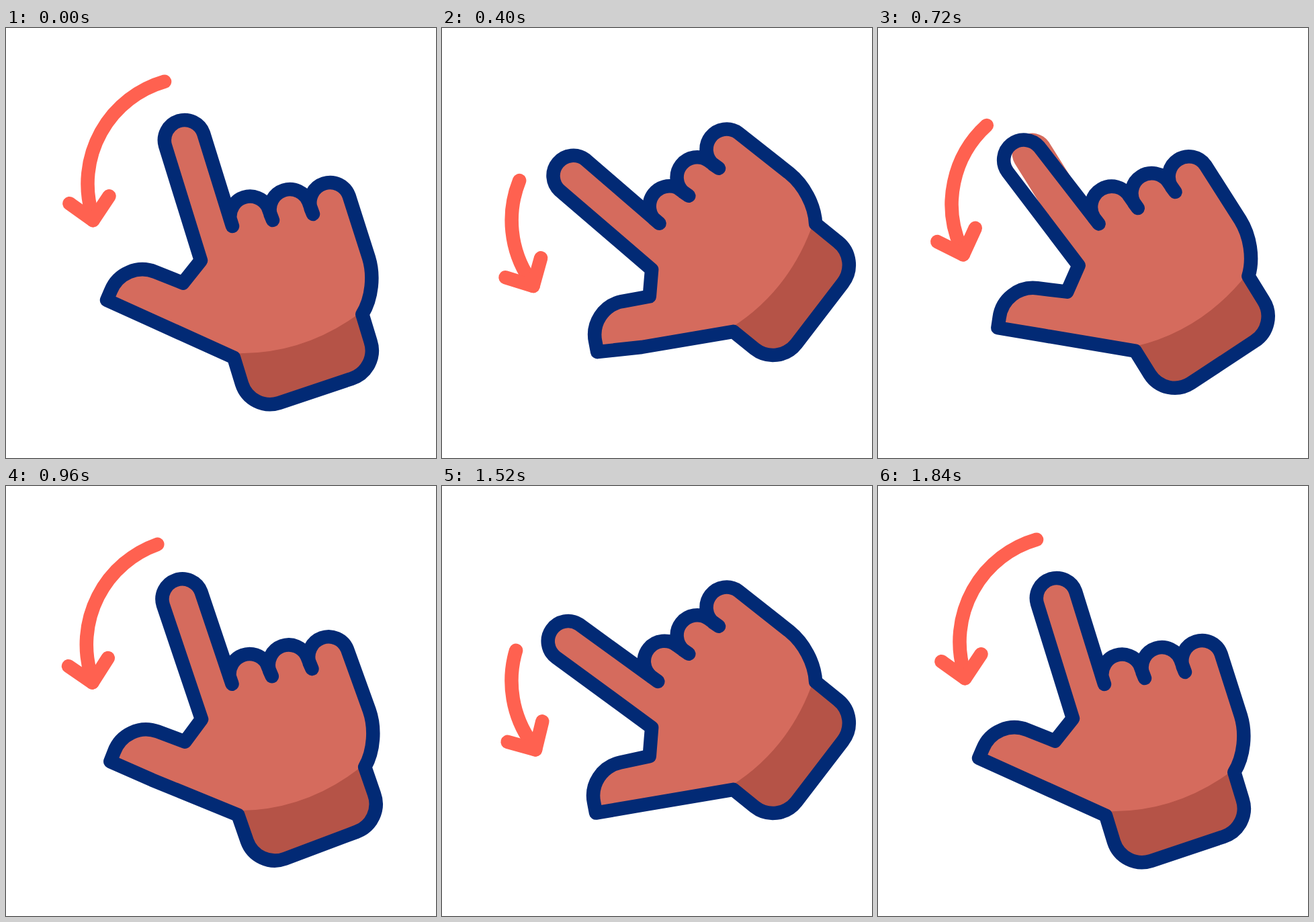
Write an HTML page that moves like this. It is 640 by 640 pixels and loops after 2 s.

```html
<!DOCTYPE html>
<html lang="en">
<head>
<meta charset="utf-8">
<title>Swipe gesture</title>
<style>
html, body { margin: 0; width: 100%; height: 100%; overflow: hidden; background: #fff; }
svg { display: block; width: 100%; height: 100%; }
path { stroke-linecap: round; stroke-linejoin: round; }
.line { fill: none; stroke-width: 20.5; }
</style>
</head>
<body>
<svg viewBox="0 0 640 640">
  <g id="arrow" stroke="#ff6150">
    <path id="arc" class="line"/>
    <path id="head" class="line" d="M-35-25L0 0L24-36"/>
  </g>
  <g id="hand">
    <path id="skin" fill="#d56b5d"/>
    <path fill="#b55347" d="M340 484Q443 487 529.5 422L542.6 466.4A44 44 0 0 1 514.3 521.9L406.6 558A44 44 0 0 1 351 529.6Z"/>
    <path id="outline" class="line" stroke="#022a75"/>
  </g>
</svg>
<script>
const LOOP = 2000, STEP = 40, PIVOT = [323, 316.5], RAD = Math.PI / 180;
const $ = id => document.getElementById(id);

// Shared key times, with one row of values for each moving part
const TIMES = [100, 250, 400, 490, 640, 720, 895, 960, 1200, 1435, 1520, 1760, 1840];
const PALM = [0, 13, 34, 39, 26, 14.8, 0, 2.1, 25.1, 39, 34, 3.5, 0];
const FINGER = [0, 9, 31.9, 38.5, 30.5, 20.5, 0, 1.3, 19.2, 38.5, 36.8, 6.5, 0];
const SWEEP = [0, .31, .907, 1.06, .77, .455, 0, .06, .655, 1.05, 1, .11, 0];
const THUMB = [0, 1.1, .43, 0, 0, 0, 0, .2, 1, .2, 0, 0, 0];

// Monotone cubic interpolation: flat at every turning point
function curve(v, t) {
  const last = TIMES.length - 1;
  if (t <= TIMES[0]) return v[0];
  if (t >= TIMES[last]) return v[last];
  const i = TIMES.findIndex(x => x > t) - 1;
  const slope = k => (v[k + 1] - v[k]) / (TIMES[k + 1] - TIMES[k]);
  const tangent = k => {
    if (k < 1 || k >= last) return 0;
    const a = slope(k - 1), b = slope(k);
    return a * b > 0 ? 2 * a * b / (a + b) : 0;
  };
  const h = TIMES[i + 1] - TIMES[i], u = (t - TIMES[i]) / h, w = 1 - u;
  return v[i] * w * w * (1 + 2 * u) + v[i + 1] * u * u * (3 - 2 * u)
    + h * u * w * (tangent(i) * w - tangent(i + 1) * u);
}

// Hand in its own frame; turn swings the index finger, bend moves the thumb
function handPath(turn, bend) {
  const c = Math.cos(turn * RAD), s = Math.sin(turn * RAD);
  const tip = (x, y) => {
    x -= PIVOT[0]; y -= PIVOT[1];
    return `${PIVOT[0] + x * c + y * s} ${PIVOT[1] - x * s + y * c}`;
  };
  const thumb = (x, y) => `${x + 9.9 * bend} ${y - 5.9 * bend}`;
  const arc = r => `A${r} ${r} 0 0 1 `;
  return `M339 490.5L213 433.5L${thumb(150, 405)}L${thumb(156, 391)}${arc(50.7)}${thumb(222, 363)}`
    + `L${263.3 + 3.4 * bend} ${379.5 - 5 * bend}L290 346`
    + `L${tip(237, 175.3)}${arc(30)}${tip(294, 156.7)}`
    + `L${tip(337, 295)}L${tip(333.5, 284)}${arc(30)}389.5 266`
    + `L397 286L393.5 277.3${arc(30)}450.5 259`
    + `L457 277L453.5 268.3${arc(30)}510.5 249.7`
    + `L540 342C548 368 545 402 530.3 426`
    + `L542.6 466.4${arc(44)}514.3 521.9L406.6 558${arc(44)}351 529.6Z`;
}

function drawArrow(q) {
  const swing = Math.sin(q * Math.PI / 2);
  const cx = 280 - 18 * swing, cy = 232 + 38 * q + 20 * swing;
  const at = (deg, r) => [cx - r * Math.cos(deg * RAD), cy - r * Math.sin(deg * RAD)];
  const end = -19.8 - 20 * q ** 1.15;
  $('arc').setAttribute('d', `M${at(73.9 - 57.3 * q, 158.5)}A158.5 158.5 0 0 0 ${at(end + 4, 158.5)}L${at(end, 160)}`);
  $('head').setAttribute('transform', `translate(${at(end, 160)}) rotate(${-20 * q})`);
}

function draw(t) {
  const palm = curve(PALM, t), finger = curve(FINGER, t), bend = curve(THUMB, t);
  $('hand').setAttribute('transform', `rotate(${-palm} ${PIVOT})`);
  // The skin follows the outline on the way down, and the palm on the way back
  $('skin').setAttribute('d', handPath(Math.min(finger, palm) - palm, bend));
  $('outline').setAttribute('d', handPath(finger - palm, bend));
  drawArrow(curve(SWEEP, t));
}

const start = performance.now();
function tick() {
  const t = (performance.now() - start) % LOOP;
  draw(Math.floor(t / STEP) * STEP);
  requestAnimationFrame(tick);
}
tick();
</script>
</body>
</html>
```
